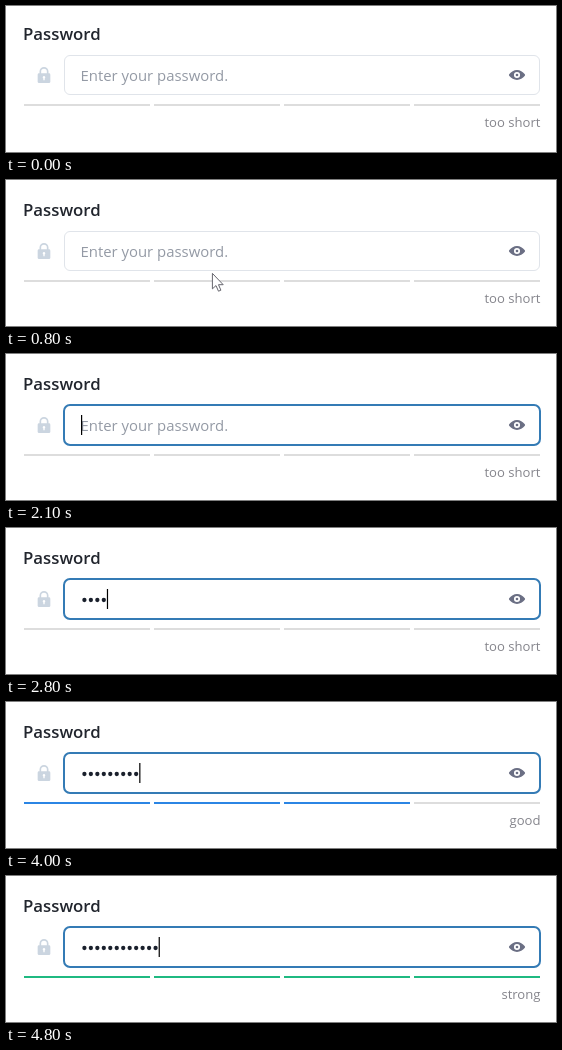
These frames come from a looping animation (550x146 px, 5000 ms). An HTML page:

```html
<!DOCTYPE html>
<html lang="en">
<head>
<meta charset="utf-8">
<title>Password strength</title>
<style>
  html, body { margin: 0; width: 100%; height: 100%; overflow: hidden; background: #fff; }
  svg { display: block; font-family: "Open Sans", "Noto Sans", sans-serif; }
  .title { font-size: 16.8px; font-weight: 600; fill: #22262e; }
  .hint { font-size: 14.9px; fill: #949aa5; }
  .word { font-size: 13.1px; fill: #85858c; text-anchor: end; }
</style>
</head>
<body>
<svg width="550" height="146" viewBox="0 0 550 146">
  <g id="form">
    <text class="title" x="17" y="36">Password</text>
    <g transform="translate(30 63) scale(.6667)" fill="#cbd5e0">
      <path d="M6.5 11V6.75a5.5 5.5 0 0 1 11 0V11" fill="none" stroke="#cbd5e0" stroke-width="2.5"/>
      <rect x="2.5" y="9.5" width="19" height="14.5" rx="2"/>
      <path d="M12 13.5a2 2 0 0 1 1 3.7V20h-2v-2.8a2 2 0 0 1 1-3.7" fill="#fff"/>
    </g>
    <rect x="58.5" y="51.5" width="475" height="39" rx="5.5" fill="#fff" stroke="#e0e4ea"/>
    <rect id="ring" x="58" y="51" width="476" height="40" rx="6" fill="none" stroke="#347bb5" stroke-width="2"/>
    <text class="hint" id="hint" x="74.5" y="77">Enter your password.</text>
    <g id="dots" fill="#1a202c"></g>
    <rect id="caret" y="61" width="1.2" height="20" fill="#000"/>
    <g transform="translate(503 63) scale(.6667)" fill="#6b6f84">
      <path fill-rule="evenodd" d="M23.4 10.5C20.8 7.6 16.4 4.5 12 4.6 7.6 4.5 3.2 7.6.6 10.5a2.2 2.2 0 0 0 0 3C3.2 16.4 7.5 19.4 12 19.4s8.8-3 11.4-5.9a2.2 2.2 0 0 0 0-3ZM7.4 12a4.6 4.6 0 1 1 9.2 0 4.6 4.6 0 0 1-9.2 0Z"/>
      <circle cx="12" cy="12" r="2"/>
    </g>
    <g id="bars"></g>
    <text class="word" id="word" x="534.5" y="123"></text>
  </g>
  <path id="pointer" d="M0 0V15.5L3.6 12.2 6.1 17.8 8.5 16.8 6.1 11.3H10.8Z" fill="#fff" stroke="#66666e" stroke-linejoin="round"/>
</svg>
<script>
const LOOP = 5000, FOCUS = 1100, PITCH = 6.47, MIN_LENGTH = 6;
const KEYS = [2200, 2300, 2500, 2700, 3000, 3200, 3400, 3800, 4000, 4200, 4500, 4700];
const LEVELS = [
  ['too short', '#ddd'], ['weak', '#ef4836'], ['okay', '#f9ab43'],
  ['good', '#2b85e4'], ['strong', '#1fb981']
];

const $ = id => document.getElementById(id);
const show = (el, on) => el.setAttribute('visibility', on ? 'visible' : 'hidden');
const ramp = (t, from, to) => {
  const p = Math.min(1, Math.max(0, (t - from) / (to - from)));
  return p * p * (3 - 2 * p);
};

function add(parent, tag, attrs) {
  const el = document.createElementNS('http://www.w3.org/2000/svg', tag);
  for (const name in attrs) el.setAttribute(name, attrs[name]);
  parent.append(el);
  return el;
}

const dots = KEYS.map((_, i) => add($('dots'), 'circle', { cx: 78.4 + i * PITCH, cy: 72, r: 2.15 }));
const bars = [0, 1, 2, 3].map(i => add($('bars'), 'rect', { x: 18 + 130 * i, y: 100, width: 126, height: 2 }));

// The score rises with every second character past the minimum length.
const score = n => n < MIN_LENGTH ? 0 : Math.min(4, Math.floor((n - 3) / 2));

function render(t) {
  const typed = KEYS.filter(k => k <= t).length;
  const level = score(typed);
  const [label, color] = LEVELS[level];

  $('form').setAttribute('transform', `translate(0 ${t < 100 ? -2 : 0})`);
  $('ring').setAttribute('opacity', ramp(t, 1030, 1180));
  show($('hint'), !typed);
  dots.forEach((dot, i) => show(dot, i < typed));
  bars.forEach((bar, i) => bar.setAttribute('fill', i < level ? color : '#ddd'));
  $('word').textContent = label;

  const since = t - (typed ? KEYS[typed - 1] : FOCUS);
  $('caret').setAttribute('x', 75 + typed * PITCH);
  show($('caret'), since >= 0 && since % 1000 < 500);

  const move = ramp(t, 550, 950);
  $('pointer').setAttribute('transform', `translate(${238 - 46 * move} ${119.5 - 38 * move})`);
  show($('pointer'), t >= 100 && t < 900);
}

function tick() {
  render(performance.now() % LOOP);
  requestAnimationFrame(tick);
}
tick();
</script>
</body>
</html>
```
